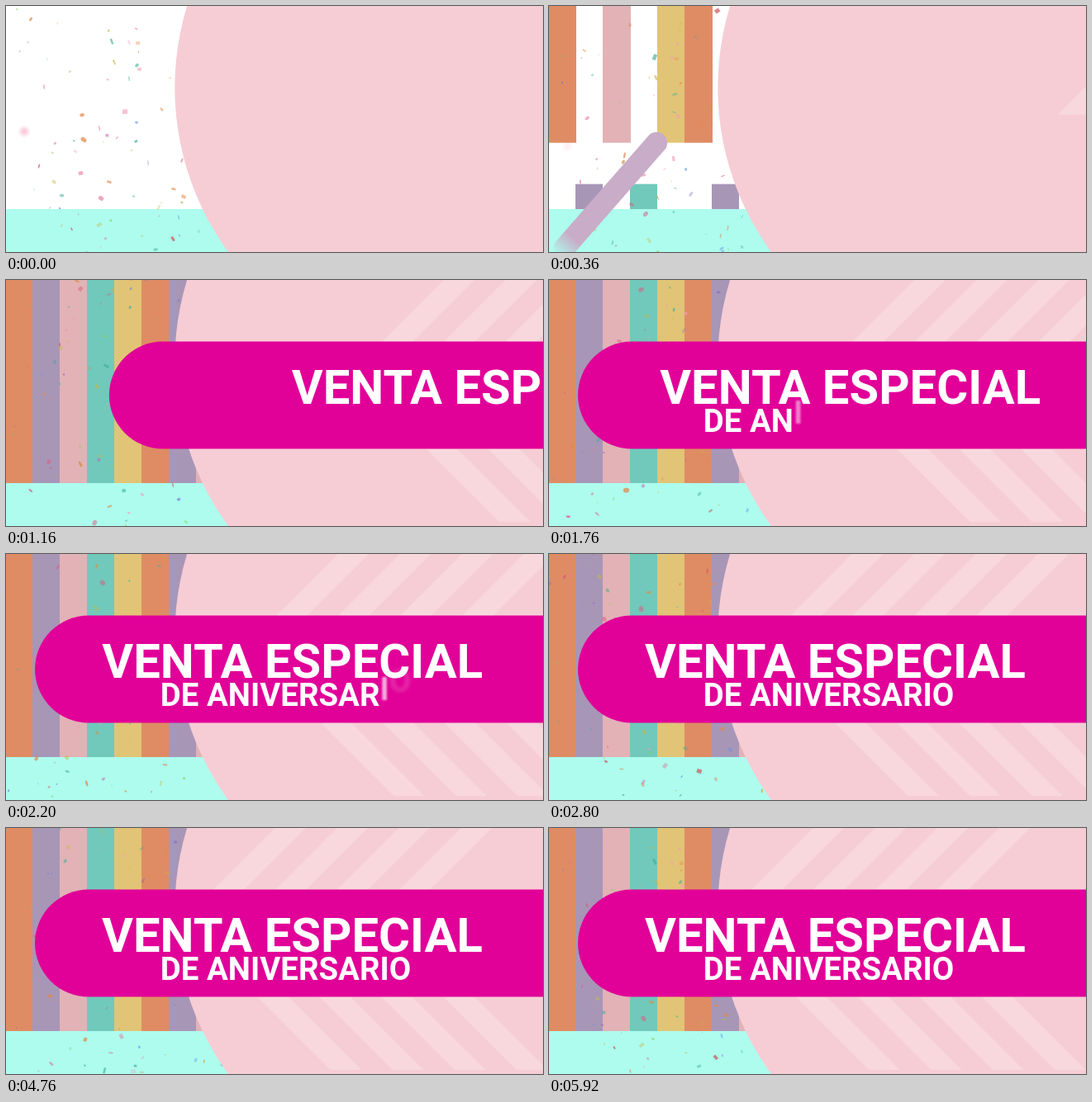
An HTML page with a canvas for the animation above (5.96 s loop, 650 px wide and 298 px high).

```html
<!DOCTYPE html>
<html lang="es">
<head>
<meta charset="utf-8">
<style>
  html, body { margin: 0; width: 100%; height: 100%; overflow: hidden; background: #fff; }
  #stage { position: relative; width: 650px; height: 298px; overflow: hidden; }
  canvas { position: absolute; left: 0; top: 0; }
  .line {
    position: absolute; white-space: pre; color: #fff; line-height: 1;
    font-family: Roboto, Arial, sans-serif; font-weight: 700;
    transform: translateX(-50%);
  }
  #title { left: 346.5px; top: 101px; font-size: 58px; }
  #sub { left: 338.5px; top: 152px; font-size: 38.4px; }
  #sub span { position: relative; }
</style>
</head>
<body>
<div id="stage">
  <canvas id="art" width="650" height="298"></canvas>
  <div id="title" class="line">VENTA ESPECIAL</div>
  <div id="sub" class="line"></div>
</div>
<script>
const W = 650, H = 298, LOOP = 5960, STEP = 40, FLOOR = 246;
const g = document.getElementById('art').getContext('2d');
const title = document.getElementById('title');
const sub = document.getElementById('sub');

const letters = [...'DE ANIVERSARIO'].map(c => {
  const s = document.createElement('span');
  s.textContent = c;
  sub.appendChild(s);
  return s;
});

const progress = (t, start, dur) => Math.min(1, Math.max(0, (t - start) / dur));
const easeOut = (p, n) => 1 - Math.pow(1 - p, n);

let seed = 41;
function rnd() {
  seed = (seed * 16807) % 2147483647;
  return seed / 2147483647;
}

// Confetti: x, y, tint of the larger pieces; the small ones are seeded.
const TINTS = ['#e0567f', '#e08a4a', '#c9b64a', '#3fae98', '#8468c8', '#c95fb0', '#5f8fe8', '#8fc850', '#c94f55', '#f29fb8'];
const LARGE = [
  [30, 16, 1], [128, 43, 3], [149, 44, 9], [131, 68, 2], [149, 88, 3], [46, 98, 0],
  [92, 132, 1], [113, 148, 0], [94, 162, 1], [172, 190, 4], [40, 194, 0], [58, 213, 2],
  [115, 233, 0], [185, 244, 2], [213, 187, 8], [215, 231, 1], [202, 282, 8],
  [113, 265, 2], [209, 256, 6], [144, 128, 0]
];
function piece(x, y, tint, size) {
  return {
    x, y, size, tint: TINTS[tint],
    falls: 1 + Math.floor(rnd() * 3),
    sway: 4 + rnd() * 9,
    swing: 1 + Math.floor(rnd() * 3),
    phase: rnd() * 6.28,
    spin: Math.floor(rnd() * 9) - 4,
    flip: 3 + Math.floor(rnd() * 5),
    ratio: 0.3 + rnd() * 0.4,
    alpha: 0.35 + rnd() * 0.4,
    round: rnd() < 0.65
  };
}
const confetti = LARGE.map(([x, y, tint]) => piece(x, y, tint, 5.5 + rnd() * 2));
for (let i = 0; i < 55; i++) {
  confetti.push(piece(rnd() * 262, rnd() * 310, Math.floor(rnd() * 10), 2.2 + rnd() * 3.3));
}

function drawConfetti(t) {
  const u = t / LOOP, span = 314;
  for (const c of confetti) {
    const x = c.x + c.sway * (Math.sin(6.2832 * u * c.swing + c.phase) - Math.sin(c.phase));
    const y = (c.y + 8 + u * c.falls * span) % span - 8;
    const turn = Math.abs(Math.cos(6.2832 * u * c.flip + c.phase));
    const w = c.size, h = c.size * (0.2 + c.ratio * turn);
    g.save();
    g.translate(x, y);
    g.rotate(c.phase + 6.2832 * u * c.spin);
    g.globalAlpha = c.alpha;
    g.fillStyle = c.tint;
    g.beginPath();
    if (c.round) g.ellipse(0, 0, w / 2, h / 2, 0, 0, 7);
    else g.rect(-w / 2, -h / 2, w, h);
    g.fill();
    g.restore();
  }
  // one soft piece, out of focus, that fades early
  const y = 152 + t * 0.05;
  const blur = g.createRadialGradient(22, y, 0, 22, y, 8);
  blur.addColorStop(0, `rgba(244,150,180,${0.6 * (1 - progress(t, 0, 500))})`);
  blur.addColorStop(1, 'rgba(244,150,180,0)');
  g.fillStyle = blur;
  g.fillRect(14, y - 8, 16, 16);
}

const STRIPES = ['#df8c64', '#a896b7', '#e2b2b6', '#70c9ba', '#e2c476', '#df8c64', '#a896b7', '#e2b2b6'];
const RISING = [1, 3, 6];
function drawStripes(t) {
  const drop = FLOOR * easeOut(progress(t, 120, 560), 2);
  const rise = FLOOR * easeOut(progress(t, 320, 628), 2);
  const stripe = (i, y, h, w) => {
    g.fillStyle = STRIPES[i];
    g.fillRect(i * 33 - 1, y, w, h);
  };
  STRIPES.forEach((_, i) => RISING.includes(i) || stripe(i, 0, drop, 34));
  RISING.forEach(i => stripe(i, FLOOR - rise, rise, 33));
}

function poly(...pts) {
  g.beginPath();
  pts.forEach(([x, y]) => g.lineTo(x, y));
  g.fill();
}

function drawChevrons(t) {
  const tip = 185 + 303 * Math.exp(-0.00088 * (t - 760));
  const mid = 131.5, low = 293, w = 37.5;
  g.fillStyle = '#f8d8dd';
  for (let i = 0; i < 4; i++) {
    const a = tip + i * 2 * w, b = a + w;
    poly([a, mid], [b, mid], [b + mid, 0], [a + mid, 0]);
    poly([b, mid], [b + w, mid], [b + w + low - mid, low], [b + low - mid, low]);
  }
}

// Streaks: x at the top edge, width, start of the tail, length of the fade
const STREAKS = [[205.5, 34, 560, 36], [275.2, 26, 517, 30], [152, 1.5, 527, 14]];
const DIR = [-0.6585, 0.7526];
function drawStreaks(t) {
  for (const [x, width, leave, fade] of STREAKS) {
    const head = 400 - 450 * easeOut(progress(t, leave - 220, 280), 2);
    const tail = 390 - 450 * Math.pow(progress(t, leave, 350), 2);
    if (head >= tail || t < leave - 220 || tail < -40) continue;
    const at = s => [x + DIR[0] * s, DIR[1] * s];
    const paint = g.createLinearGradient(...at(tail + width / 2), ...at(tail + width / 2 - fade));
    paint.addColorStop(0, 'rgba(200,172,200,0)');
    paint.addColorStop(1, '#c8acc8');
    g.strokeStyle = paint;
    g.lineWidth = width;
    g.lineCap = 'round';
    g.beginPath();
    g.moveTo(...at(head));
    g.lineTo(...at(tail));
    g.stroke();
  }
}

function drawBanner(t) {
  const x = 35 + 615 * Math.pow(1 - progress(t, 840, 676), 3);
  if (x >= W) return;
  g.fillStyle = '#e10098';
  g.beginPath();
  g.arc(x + 65, 139.5, 65, Math.PI / 2, Math.PI * 1.5);
  g.lineTo(W + 70, 74.5);
  g.lineTo(W + 70, 204.5);
  g.fill();
}

function drawText(t) {
  const dx = 562 * Math.pow(1 - progress(t, 840, 1597), 4);
  title.style.transform = `translateX(calc(-50% + ${dx.toFixed(2)}px))`;
  title.style.visibility = t < 840 ? 'hidden' : 'visible';
  letters.forEach((s, i) => {
    const p = progress(t, 1400 + i * 60, 120);
    s.style.opacity = p;
    s.style.top = -20 * (1 - p) + 'px';
    s.style.filter = p < 1 ? `blur(${(2.4 * (1 - p)).toFixed(2)}px)` : 'none';
  });
}

function draw(t) {
  g.fillStyle = '#fff';
  g.fillRect(0, 0, W, H);
  drawStripes(t);
  g.fillStyle = '#adfcee';
  g.fillRect(0, FLOOR, W, H - FLOOR);
  drawConfetti(t);
  g.fillStyle = '#f6cdd5';
  g.beginPath();
  g.arc(542.8, 99, 338.5, 0, 7);
  g.fill();
  drawChevrons(t);
  drawStreaks(t);
  drawBanner(t);
  drawText(t);
}

const begin = performance.now();
function tick() {
  const t = (performance.now() - begin) % LOOP;
  draw(Math.floor(t / STEP) * STEP);
  requestAnimationFrame(tick);
}
tick();
</script>
</body>
</html>
```
